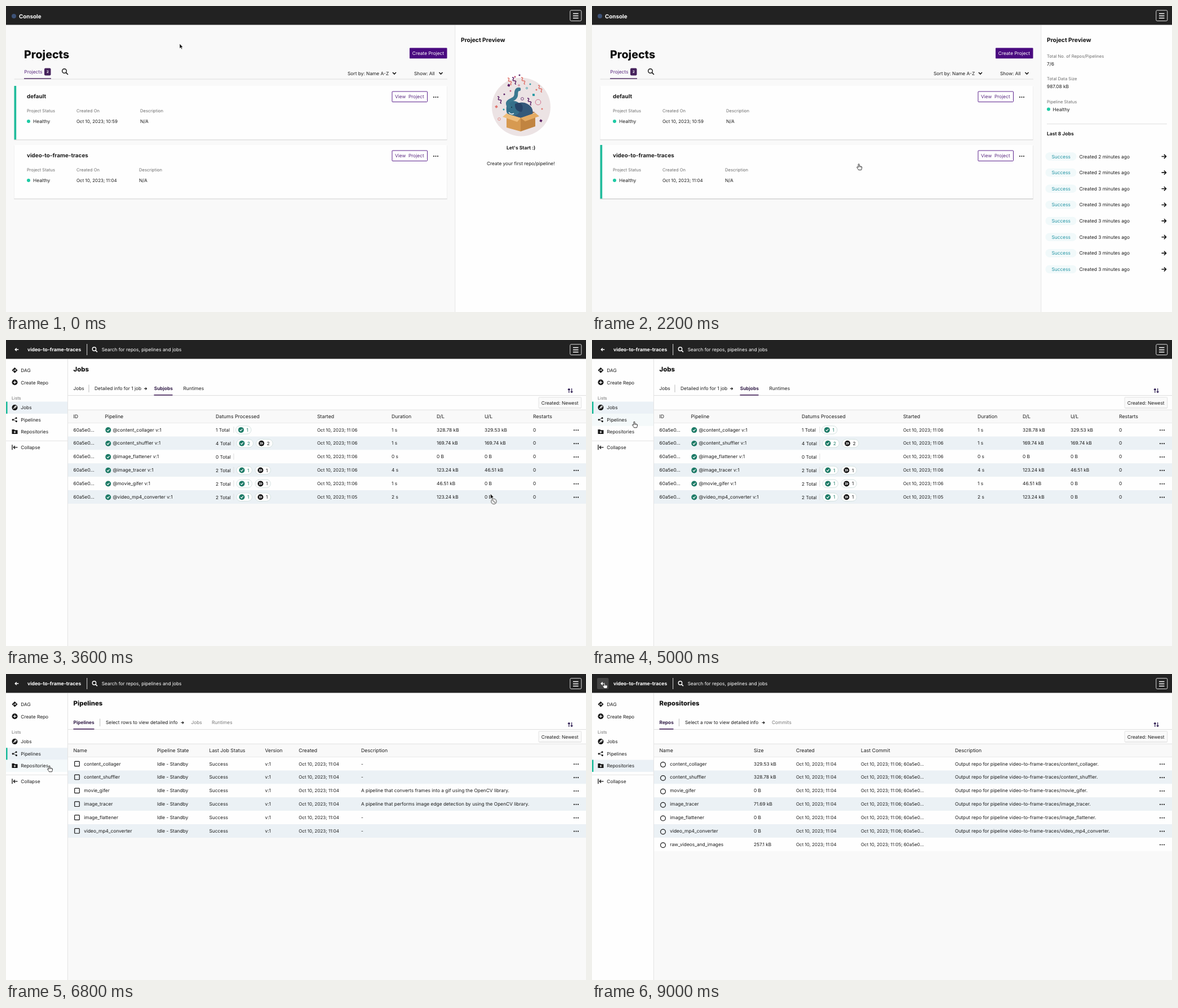
These frames come from a looping animation (1029 px wide and 544 px high, 9.2 s). An HTML page:

```html
<!DOCTYPE html>
<html lang="en">
<head>
<meta charset="utf-8">
<title>Console</title>
<style>
html, body { margin: 0; width: 100%; height: 100%; overflow: hidden; background: #f9f9f9; }
svg { display: block; }
text { font: 8.35px Inter, sans-serif; fill: #1c1c1c; text-rendering: geometricPrecision; }
.title { font-size: 19.6px; font-weight: 800; fill: #111; }
.head { font-size: 11.4px; font-weight: 800; fill: #111; }
.sub { font-size: 10.3px; font-weight: 700; fill: #111; }
.name { font-size: 9.85px; font-weight: 700; }
.small { font-size: 8.55px; font-weight: 700; }
.label { font-size: 7.6px; fill: #6d6d6d; }
.col { font-size: 8.75px; }
.date { font-size: 8px; }
.bold { font-weight: 700; fill: #35204a; }
.gray { fill: #777; }
.white { fill: #fff; }
.purple { fill: #5b2a80; }
.teal { fill: #2494a3; }
.green { fill: #1c7a66; }
</style>
</head>
<body>
<svg id="stage" width="1029" height="544" viewBox="0 0 1029 544"></svg>
<script>
const STEP = 200, LOOP = 9200;
const TEAL = '#20bc9c', PURPLE = '#4a0a80', INK = '#151515';

// y is the vertical middle of the capitals
const text = (x, y, s, cls = '', drop = 3) => `<text x="${x}" y="${y + drop}" class="${cls}">${s}</text>`;
const rect = (x, y, w, h, fill, more = '') => `<rect x="${x}" y="${y}" width="${w}" height="${h}" fill="${fill}" ${more}/>`;
const dot = (x, y, r, fill, more = '') => `<circle cx="${x}" cy="${y}" r="${r}" fill="${fill}" ${more}/>`;
const line = (d, stroke, w = 1, more = '') => `<path d="${d}" fill="none" stroke="${stroke}" stroke-width="${w}" ${more}/>`;
const shape = (d, fill, more = '') => `<path d="${d}" fill="${fill}" ${more}/>`;
const at = (x, y, s) => `<g transform="translate(${x} ${y})">${s}</g>`;
const each = (list, f) => list.map(f).join('');

const dots = (x, y) => each([-3.5, 0, 3.5], d => dot(x + d, y, 1.05, INK));
const arrow = (x, y, n, color, w) => line(`M${x} ${y}h${n}m${-n * .45} ${-n * .45}l${n * .45} ${n * .45}l${-n * .45} ${n * .45}`, color, w);
const chevron = (x, y) => line(`M${x - 3} ${y - 1.5}l3 3l3 -3`, INK, 1.6);
const lens = (x, y, r, color) => line(`M${x + r * .7} ${y + r * .7}l${r} ${r}`, color, 1.6) + dot(x, y, r, 'none', `stroke="${color}" stroke-width="1.4"`);
const check = (x, y) => dot(x, y, 5, '#1c7a66') + line(`M${x - 2.2} ${y}l1.7 1.8l2.8 -3.6`, '#fff', 1.2);
const skip = (x, y) => dot(x, y, 5, '#111') + line(`M${x - 2.6} ${y - 2.2}l2.2 2.2l-2.2 2.2m2.8 -4.4l2.2 2.2l-2.2 2.2`, '#fff', 1.1);

// Pointer stops: time, tip x, tip y
const PATH = [
  [0, 308, 67], [200, 326, 190], [400, 341, 303], [600, 341, 303], [1600, 339, 283], [1800, 339, 283],
  [2000, 350, 283], [2600, 720, 276], [3000, 859, 270], [3400, 860, 274], [3600, 859.5, 273.5], [4200, 592, 304],
  [4400, 400, 245], [4600, 236, 183], [4800, 236, 183], [5000, 75, 145], [5800, 71, 142], [6000, 71, 142],
  [6800, 77, 163], [8200, 77, 163], [8600, 50, 82], [8800, 24, 18], [9000, 22, 15], [LOOP, 22, 15]
];

function tipAt(t) {
  const i = PATH.findIndex(p => p[0] > t), [t0, x0, y0] = PATH[i - 1], [t1, x1, y1] = PATH[i];
  const k = (t - t0) / (t1 - t0);
  return { x: x0 + (x1 - x0) * k, y: y0 + (y1 - y0) * k };
}

const ARROW = shape('M0 0V8.6L2 6.8L3.4 9.8L4.8 9.2L3.5 6.2H6Z', '#111', 'stroke="#fff" stroke-width=".6"');
const HAND = shape('M-1 1C-1 -.3 1 -.3 1 1V4.3C1.3 3.5 2.5 3.7 2.6 4.5C3.2 3.9 4.1 4.2 4.2 5C5 4.5 5.6 5 5.6 6C5.6 8 5 9 4.5 10.8H-.5C-1 9.2 -3 7.6 -3.4 6C-3.4 5 -2.2 5 -1 6.4Z',
  '#fff', 'stroke="#222" stroke-width=".9"') + line('M1 4.3V6M2.6 4.6V6.2M4.2 5V6.4', '#222', .6);
const DENY = ARROW + dot(6, 13.5, 4.7, '#eee', 'stroke="#8b8b8b" stroke-width="1.5"') + line('M2.8 10.3l6.4 6.4', '#8b8b8b', 1.4);

const topBar = () => rect(0, 0, 1029, 33.5, '#222') +
  rect(1000.8, 7.7, 20, 18.8, 'none', 'rx="2" stroke="#ddd"') + line('M1006 13.5h9.5m-9.5 4h9.5m-9.5 4h9.5', '#fff', 1.4);

function card(y, name, time, descX, active, hover) {
  return rect(14, y + .8, 769, 96.2, '#000', `rx="1" opacity="${hover ? .08 : .04}"`) +
    rect(14.5, y + 1, 768, 95.3, '#000', `opacity="${hover ? .13 : .1}"`) +
    rect(14.5, y, 768, 95.3, '#fefefe') + (active ? rect(14.5, y, 3.7, 95.5, TEAL) : '') +
    text(37, y + 18.5, name, 'name', 3.6) +
    each([[37, 'Project Status'], [125, 'Created On'], [descX, 'Description']], ([x, s]) => text(x, y + 44.5, s, 'label', 2.8)) +
    dot(40, y + 63, 3, '#1dcaa4') + text(48, y + 63, 'Healthy') + text(125, y + 63, time, 'date') + text(descX, y + 63, 'N/A') +
    rect(685, y + 10, 62.5, 18.5, '#fff', `rx="1" stroke="${PURPLE}" stroke-width=".9"`) +
    text(690, y + 19.2, 'View', 'purple') + text(714, y + 19.2, 'Project', 'purple') + dots(762.5, y + 20);
}

function confetti() {
  const colors = ['#5b2065', '#e0756d', '#2a9aa5', '#c9577a'];
  const bits = [[892, 141], [870, 179], [936, 158], [949, 204], [884, 157], [951, 183], [930, 139], [895, 151], [911, 123], [941, 149], [883, 184], [903, 126]];
  const curls = [[890, 128, 1], [914, 127, 1], [872, 161, 0], [944, 141, 1], [925, 164, 0], [898, 127, 0]];
  const rings = [[944, 171, 4.8], [916, 165, 2.4], [875, 201, 2.3], [924, 146, 1.5], [910, 141, 1.3]];
  return each(bits, ([x, y], i) => {
    const size = i < 4 ? 4 : 2.6;
    return rect(x - size / 2, y - size / 2, size, size, colors[i == 3 ? 0 : i % 4], `transform="rotate(${25 + i * 31} ${x} ${y})"`);
  }) +
    each(curls, ([x, y, c]) => line(`M${x} ${y}q4 0 2 3t2 3t2 3t1 3`, colors[c], 1.5)) +
    each(rings, ([x, y, r], i) => dot(x, y, r, 'none', `stroke="${colors[(i + 3) % 4]}" stroke-width=".8"`));
}

const welcome = () => dot(914, 179.5, 52, '#ece3e4') + confetti() +
  shape('M888 190L914 182L939 189L913 199Z', '#a66c35') +
  shape('M893 196C894 178 911 166 925 174C933 178 936 186 934 192L914 199Z', '#34597a') +
  shape('M888 188C886 174 892 168 902 169C912 170 916 180 910 190C904 198 891 197 888 188Z', '#356f8a') +
  line('M892 179C884 165 905 170 905 157C905 150 907 148 910 148', '#3b7890', 6.5, 'stroke-linecap="round"') +
  shape('M903 174C914 168 920 178 915 188C908 189 902 183 903 174Z', '#274468') +
  line('M892 189q4 5 9 2', '#e8eff2', 1.6) + dot(897, 180, 1, '#142d3d') +
  shape('M888 192L913 199V223L888 216Z', '#d79a51') + shape('M913 199L939 191V214L913 223Z', '#c18440') +
  shape('M888 191L881 197L907 206L913 199Z', '#efbd7b') + shape('M913 199L921 205L946 196L939 190Z', '#e4aa62') +
  text(888, 252, "Let's Start :)", 'small') + text(853, 280, 'Create your first repo/pipeline!');

function jobPanel(tip) {
  const rows = each([2, 2, 3, 3, 3, 3, 3, 3], (n, i) => {
    const y = 267.5 + i * 28.65, over = tip.x > 797 && Math.abs(tip.y - y) < 14.3;
    return (over ? rect(797.5, y - 14.3, 231.5, 28.4, '#f2f2f2') : '') +
      rect(804.5, y - 7.3, 55, 14.6, '#f1f9fa', 'rx="7"') + text(815.5, y, 'Success', 'teal') +
      text(864.5, y, `Created ${n} minutes ago`) + arrow(1010.5, y, 8, INK, 1.6);
  });
  const facts = [['Total No. of Repos/Pipelines', '7/6'], ['Total Data Size', '987.08 kB'], ['Pipeline Status', 'Healthy']];
  return each(facts, ([a, b], i) => text(807, 89 + i * 40.5, a, 'label', 2.8) + text(i == 2 ? 817.5 : 807, 102.5 + i * 40.5, b)) +
    dot(810, 183.5, 3, '#1dcaa4') + line('M807 209.7H1020', '#ddd') + text(807, 226.5, 'Last 8 Jobs', 'small') + rows;
}

function projects(t, tip) {
  const picked = t >= 1800;
  const over = y => tip.x > 14 && tip.x < 783 && tip.y > y && tip.y < y + 96;
  return topBar() + dot(14, 18, 4, '#3d5277') + text(23, 18.5, 'Console', 'name white', 3.5) +
    text(32, 86, 'Projects', 'title', 7) +
    rect(716, 75.2, 66.5, 18.8, '#000', 'opacity=".1"') + rect(716, 74.5, 66.5, 18.7, PURPLE, 'rx="1"') + text(720.8, 84, 'Create Project', 'white') +
    text(32.3, 117, 'Projects', 'purple') + rect(68, 110.5, 11.5, 13, '#46235c', 'rx="2"') +
    '<text x="72" y="119.2" class="white" style="font-size:6px;font-weight:700">2</text>' +
    lens(103.5, 115.5, 3.8, INK) + line('M14.5 130H783', '#dcdcdc') + rect(32, 128.3, 48, 1.4, '#46235c') +
    text(606, 119.5, 'Sort by: Name A-Z') + chevron(689, 119.5) + text(724, 119.5, 'Show: All') + chevron(771.5, 119.5) +
    card(142, 'default', 'Oct 10, 2023; 10:59', 238, !picked, over(142)) +
    card(247, 'video-to-frame-traces', 'Oct 10, 2023; 11:04', 236, picked, over(247)) +
    rect(797, 34, 232, 510, '#fefefe') + line('M796.8 34V544', '#e6e6e6') +
    text(807, 60.5, 'Project Preview', 'sub', 3.6) + (picked ? jobPanel(tip) : welcome());
}

const ICONS = [
  shape('M0 -5L5 0L0 5L-5 0Z', INK) + line('M-1.7 1.8V-.3H2M.5 -2l1.8 1.7l-1.8 1.7', '#fff', .9),
  dot(0, 0, 5, INK) + line('M-2.8 0h5.6M0 -2.8v5.6', '#fff', 1.3),
  dot(0, 0, 5, INK) + line('M-2.8 2.2L-.5 0L.8 1.2M-.5 0Q0 -3 2.6 -2.7Q2.8 -.3 .3 .6', '#fff', 1.1),
  dot(-3.3, 0, 1.6, INK) + dot(2.6, -3, 1.5, INK) + dot(2.9, 2.8, 1.6, INK) + line('M-3 0L2.6 -3M-3 0L2.9 2.8', INK, .8),
  shape('M-5 -4H-1L0 -2.8H5V4H-5Z', INK) + line('M-2 .6h4M0 -1.4v4', '#fff', 1),
  line('M-4.5 -4.5v9M5 0H-2.2M.5 -2.7L-2.2 0L.5 2.7', INK, 1.3)
];
const MENU = [['DAG', 54], ['Create Repo', 75.5], ['Jobs', 120.3], ['Pipelines', 142], ['Repositories', 163.3], ['Collapse', 191]];

function sidebar(active, tip, t) {
  const items = each(MENU, ([name, y], i) => {
    const on = name == active, over = tip.x < 109 && Math.abs(tip.y - y) < 10.7;
    const fading = t == 7400 && name == 'Pipelines';
    const fill = on ? (over ? '#eaf2f4' : '#ebf1f6') : over || fading ? '#f4f9fa' : '';
    return (fill ? rect(0, y - 10.7, 109, 21.4, fill) : '') + (on ? rect(0, y - 10.7, 2.6, 21.4, TEAL) : '') +
      at(15.5, y - .2, ICONS[i]) + text(26.3, y, name);
  });
  return rect(0, 34, 109.5, 510, '#fefefe') + items + text(10, 103, 'Lists', 'label', 2.8) +
    line('M0 179.3H109M109.5 34V544', '#e3e3e3');
}

const REPOS = ['content_collager', 'content_shuffler', 'movie_gifer', 'image_tracer', 'image_flattener', 'video_mp4_converter'];
const DAY = 'Oct 10, 2023; ';

function pill(x, y, icon, n, cls) {
  return rect(x, y - 7.2, n > 1 ? 29.5 : 27.5, 14.4, '#fff', 'rx="7.2" stroke="#cbdbd8" stroke-width=".8"') + icon(x + 9.5, y) + text(x + 19, y, n, cls);
}

// mark draws the part of a row that is more than plain text
const TABLES = {
  Jobs: {
    cols: [[119.5, 'ID'], [175.5, 'Pipeline'], [372, 'Datums Processed'], [552, 'Started'], [684, 'Duration'], [764, 'D/L'], [849, 'U/L'], [935, 'Restarts']],
    tabs: [[119.5, 'Jobs', ''], [157, 'Detailed info for 1 job', ''], [262.7, 'Subjobs', 'bold'], [314.5, 'Runtimes', '']],
    bar: 147, arrow: 245, under: [262.5, 33],
    rows: [
      ['content_collager', 1, 1, 0, '06', 1, '328.78 kB', '329.53 kB'],
      ['content_shuffler', 4, 2, 2, '06', 1, '169.74 kB', '169.74 kB'],
      ['image_flattener', 0, 0, 0, '06', 0, '0 B', '0 B'],
      ['image_tracer', 2, 1, 1, '06', 4, '123.24 kB', '46.51 kB'],
      ['movie_gifer', 2, 1, 1, '06', 1, '46.51 kB', '0 B'],
      ['video_mp4_converter', 2, 1, 1, '05', 2, '123.24 kB', '0 B']
    ].map(([name, all, ok, skipped, min, sec, down, up]) => ({
      cells: ['60a5e0…', '', '', `${DAY}11:${min}`, `${sec} s`, down, up, 0],
      mark: y => check(181.3, y + .5) + text(189.5, y, `@${name} v:1`) + text(372, y + .6, `${all} Total`) +
        line(`M404 ${y - 5.5}v11`, '#ddd') + (ok ? pill(skipped ? 409 : 407.5, y + .3, check, ok, 'green') : '') +
        (skipped ? pill(ok > 1 ? 443.7 : 442, y + .3, skip, skipped, '') : '')
    }))
  },
  Pipelines: {
    cols: [[119.5, 'Name'], [268, 'Pipeline State'], [360.5, 'Last Job Status'], [459.5, 'Version'], [519.3, 'Created'], [630, 'Description']],
    tabs: [[119.5, 'Pipelines', 'bold'], [177, 'Select rows to view detailed info', ''], [328.5, 'Jobs', 'gray'], [365, 'Runtimes', 'gray']],
    bar: 166.7, arrow: 310.5, under: [119.5, 37],
    rows: REPOS.map((name, i) => ({
      cells: ['', 'Idle - Standby', 'Success', 'v:1', DAY + '11:04', {
        2: 'A pipeline that converts frames into a gif using the OpenCV library.',
        3: 'A pipeline that performs image edge detection by using the OpenCV library.'
      }[i] || '-'],
      mark: y => rect(121.7, y - 4.3, 8.6, 8.6, 'none', `rx="1" stroke="${INK}" stroke-width="1.2"`) + text(138.3, y, name)
    }))
  },
  Repositories: {
    cols: [[119.5, 'Name'], [287, 'Size'], [362, 'Created'], [477, 'Last Commit'], [644, 'Description']],
    tabs: [[119.5, 'Repos', 'bold'], [165, 'Select a row to view detailed info', ''], [319, 'Commits', 'gray']],
    bar: 154.5, arrow: 301.5, under: [119.5, 25],
    rows: [...REPOS, 'raw_videos_and_images'].map((name, i) => ({
      cells: ['', ['329.53 kB', '328.78 kB', '0 B', '71.69 kB', '0 B', '0 B', '257.1 kB'][i], DAY + '11:04', `${DAY}11:0${i < 6 ? 6 : 5}; 60a5e0…`,
        i < 6 ? `Output repo for pipeline video-to-frame-traces/${name}.` : ''],
      mark: y => dot(126, y + 1.5, 4.4, 'none', `stroke="${INK}" stroke-width="1.2"`) + text(138.3, y, name)
    }))
  }
};

function tablePage(name, tip, t) {
  const p = TABLES[name];
  const rows = each(p.rows, ({ cells, mark }, i) => {
    const y = 159.6 + i * 23.87;
    return rect(110, y - 11.9, 919, 23.87, i % 2 ? '#ebf1f5' : '#fefefe') + mark(y) +
      each(cells, (s, k) => text(p.cols[k][0], y, s, String(s).startsWith(DAY) ? 'date' : '')) + dots(1011.5, y + .7);
  });
  return topBar() + (tip.y < 27 ? rect(9, 7, 20.5, 20, '#444', 'rx="2"') : '') +
    line('M22.3 17h-6m2.5 -2.6l-2.6 2.6l2.6 2.6', '#fff', 1.4) +
    '<text x="38" y="20" class="white" style="font-size:8.65px;font-weight:700">video-to-frame-traces</text>' +
    line('M143.7 7V27', '#ddd') + lens(156.5, 16, 3.2, '#fff') + text(169.7, 17, 'Search for repos, pipelines and jobs', 'white') +
    rect(110, 34, 919, 90.5, '#fefefe') + sidebar(name, tip, t) + text(119.5, 51.5, name, 'head', 4) +
    each(p.tabs, ([x, s, cls]) => text(x, 86, s, cls)) + line(`M${p.bar} 79.5v13.5`, '#bbb') + arrow(p.arrow, 86.5, 4.5, INK, 1.1) +
    line('M110 98.6H1029', '#ddd') + rect(p.under[0], 97, p.under[1], 1.6, '#46235c') +
    line('M998.8 94V86.5m-1.9 2l1.9 -2l1.9 2M1003.6 86v7.5m-1.9 -2l1.9 2l1.9 -2', '#2c1b50', 1.2) +
    rect(945, 102.5, 76, 19.5, '#000', 'rx="2" opacity=".07"') + rect(945, 101.8, 75.7, 19, '#fafafa', 'rx="1" stroke="#ddd" stroke-width=".8"') + text(949.8, 111.5, 'Created: Newest') +
    rect(110, 124, 919, 23.7, '#f9f9f9') + line('M110 124.2H1029M110 147.5H1029', '#e0e0e0') +
    each(p.cols, ([x, s]) => text(x, 136, s, 'col', 3.1)) + rows;
}

function pointer(t, tip) {
  const { x, y } = tip;
  if (t == 3600) return at(x, y, DENY);
  const card = x > 14 && x < 783 && (y > 142 && y < 238 || y > 247 && y < 343);
  const link = t < 3600 ? card || x > 797 && y > 253 && y < 482
    : x < 30 && y < 27 || x < 109 && MENU.some(([, my]) => Math.abs(y - my) < 10.7);
  return at(x, y, link ? HAND : ARROW);
}

function scene(t) {
  const tip = tipAt(t);
  const page = t < 3600 ? projects(t, tip) : tablePage(t < 5400 ? 'Jobs' : t < 7200 ? 'Pipelines' : 'Repositories', tip, t);
  return rect(0, 0, 1029, 544, '#f9f9f9') + page + pointer(t, tip);
}

const stage = document.getElementById('stage');
let shown = -1;
function tick() {
  const t = Math.floor(performance.now() % LOOP / STEP) * STEP;
  if (t != shown) stage.innerHTML = scene(shown = t);
  requestAnimationFrame(tick);
}
tick();
</script>
</body>
</html>
```
